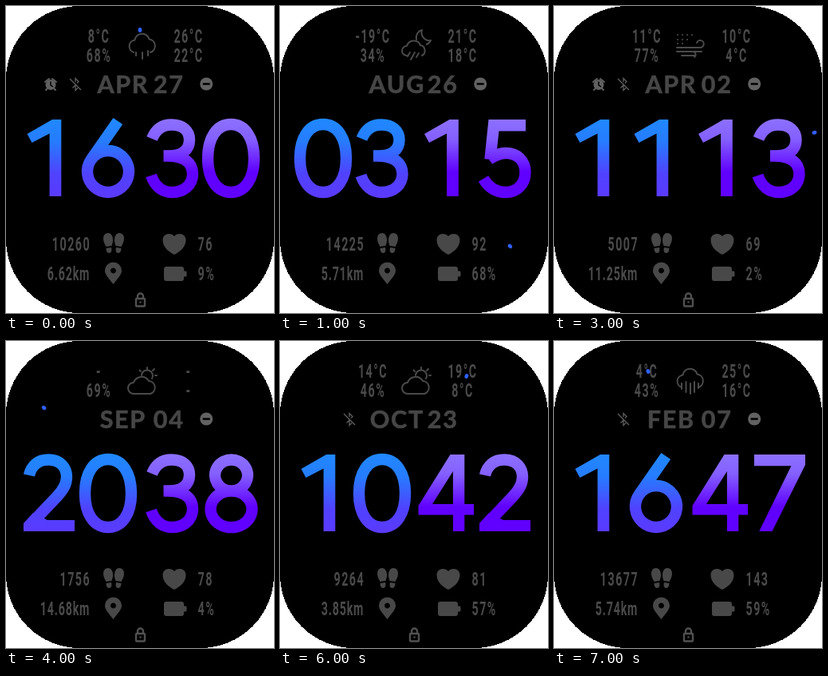
Recreate the animation shown at these times as an HTML page. Size 336 by 384 pixels, loop 8000 ms.

```html
<!DOCTYPE html>
<html lang="en">
<head>
<meta charset="utf-8">
<title>Watch face</title>
<style>
html, body { margin: 0; width: 100%; height: 100%; overflow: hidden; background: #fff; }
svg { display: block; width: 100vw; height: 100vh; }
.ink { fill: #484848; }
.line { fill: none; stroke: #4a4a4a; stroke-width: 2; stroke-linecap: round; stroke-linejoin: round; }
.slim { font: 600 23px Roboto, sans-serif; letter-spacing: 2.4px; fill: #4a4a4a; }
.dist { letter-spacing: 1.3px; }
.date { font: 700 30.5px Lato, sans-serif; letter-spacing: 1.7px; fill: #464646; stroke: #464646; stroke-width: .6; text-anchor: middle; }
.mid { text-anchor: middle; }
.end { text-anchor: end; }
</style>
</head>
<body>
<svg viewBox="0 0 336 384" preserveAspectRatio="none">
  <defs>
    <linearGradient id="blue" gradientUnits="userSpaceOnUse" x1="0" y1="142" x2="0" y2="239">
      <stop offset="0" stop-color="#2088ff"/><stop offset=".28" stop-color="#267cff"/>
      <stop offset=".7" stop-color="#5042ff"/><stop offset="1" stop-color="#5a3aff"/>
    </linearGradient>
    <linearGradient id="violet" gradientUnits="userSpaceOnUse" x1="0" y1="142" x2="0" y2="239">
      <stop offset="0" stop-color="#8c70ff"/><stop offset=".25" stop-color="#8460ff"/>
      <stop offset=".68" stop-color="#6000ff"/><stop offset="1" stop-color="#6000ff"/>
    </linearGradient>
  </defs>
  <rect width="336" height="384" rx="92" shape-rendering="crispEdges"/>

  <path id="weather" class="line"/>

  <g id="alarm" fill="#606060">
    <circle cx="56" cy="98.5" r="6.5"/>
    <path d="M49 95l5-4M63 95l-5-4M52 103l-2 2M60 103l2 2" stroke="#606060" stroke-width="2" stroke-linecap="round"/>
    <path d="M56 94.5v4.500l3 2" fill="none" stroke="#000" stroke-width="1.5"/>
  </g>
  <path id="bluetooth" d="M80 91L94 105M83.5 102.5L87 99V105.5L90 102.5M87 95V90.5L91 94.5L89 96.500" fill="none" stroke="#606060" stroke-width="1.3"/>
  <g id="quiet">
    <circle cx="251.2" cy="97.5" r="8" fill="#626262"/>
    <path d="M246.700 97.5h9" stroke="#000" stroke-width="2.500"/>
  </g>

  <g id="digits" stroke-width="14.4"></g>

  <g class="ink">
    <path d="M128 284C132 284 134 288 134 293C134 296 133 298 132.5 300L125.5 301C124 298 122 295 122 291C122 287 124 284 128 284ZM125.5 303L132 302C133 306 132 309 129.5 309C127 309 125.5 307 125.5 303Z"/>
    <path d="M142 284C138 284 136 288 136 293C136 296 137 298 137.5 300L144.5 301C146 298 148 295 148 291C148 287 146 284 142 284ZM144.5 303L138 302C137 306 138 309 140.5 309C143 309 144.5 307 144.5 303Z"/>
    <path d="M211 311C203 307 196.500 301 196.500 292.500C196.500 288 200 285 204 285C207 285 209.500 286 211 288C212.500 286 215 285 218 285C222 285 225.500 288 225.500 292.500C225.500 301 219 307 211 311Z"/>
    <path fill-rule="evenodd" d="M134.5 348C129 341 124 336 124 331A10.5 10.5 0 0 1 145 331C145 336 140 341 134.5 348ZM134.5 327.5a3.500 3.500 0 1 0 .01 0Z"/>
    <path d="M201 326H220Q223 326 223 329V331.5H225Q226.500 331.5 226.500 333V337Q226.500 338.5 225 338.5H223V341Q223 344 220 344H201Q198 344 198 341V329Q198 326 201 326Z"/>
  </g>
  <g id="lock" fill="none" stroke="#505050" stroke-width="2.4">
    <rect x="163" y="366" width="11" height="9.500" rx="1"/>
    <path d="M165 366V363a3.500 3.500 0 0 1 7 0V366M168.5 369.5v2"/>
  </g>

  <g id="labels"></g>
  <rect id="second" x="165.700" y="27" width="4.600" height="6" rx="2.300" fill="#2f60ff"/>
</svg>
<script>
const $ = id => document.getElementById(id);

// Numerals, centred on x = 0: [stroked path, filled path]
const GLYPHS = {
  0: ['M-29 190.5C-29 165 -18 148 0 148S29 165 29 190.5S18 233 0 233S-29 216 -29 190.5Z', ''],
  1: ['', 'M15.300 142V238H.6V159.5L-21.500 171L-27.500 160L4 142Z'],
  2: ['M-25 168C-22 155 -13 148.5 -1 148.5C14 148.5 22 158 22 170C22 180 17 187 10 194.5L-20 226', 'M-32 238V228L-20 215L-2 224H32V238Z'],
  3: ['M-25.500 166C-21 155 -13 148.5 -1 148.5C13 148.5 21.500 156 21.500 167.5C21.500 180 12 187.5 -4 187.5H-11M-6 187.5C15 187.5 25.500 196 25.500 210C25.500 224 14 233 0 233C-13 233 -22 225 -26.500 212', ''],
  4: ['', 'M22.800 142V204H34.500V217.5H22.800V238H8.400V217.5H-35V206L5 142ZM8.400 163V204H-17.500Z'],
  5: ['M26 149.200H-14L-18.500 192M-20 192C-13 187 -6 184 1 184C16 184 25.500 194 25.500 208C25.500 223 15 233 1 233C-12 233 -21 226 -27 216', ''],
  6: ['M12.300 144L-21.300 192.100A26 26 0 1 0 21.300 192.100A26 26 0 0 0 -21.300 192.100', ''],
  7: ['', 'M-31 142H33V155L-8.500 238H-24.800L15.400 156.200H-31Z'],
  8: ['M.5 148.500a20.500 19.500 0 1 0 .01 0ZM.5 187.500a26 22.800 0 1 0 .01 0Z', '']
};
const SLOTS = [54, 128, 208.5, 282];

const CLOUD = 'M160 58A8 8 0 0 1 161.5 42.5A9.200 9.200 0 0 1 179.5 41.5A8.500 8.500 0 0 1 181 58';
const SKY = {
  rain: CLOUD + 'M163 58v4M171 58v8M178 56v6',
  pour: CLOUD + 'M160 53v7M165.5 51v13M171 53v13M176 51v13M181 53v6',
  night: 'M159 62A6 6 0 0 1 159 50A9 9 0 0 1 176 49A7 7 0 0 1 178 62M163 58l-3 5M169 58l-5 9M174 59l-3 5M171 42A10 10 0 0 1 178 30A10 10 0 0 0 189 43A9.500 9.500 0 0 1 184 48',
  wind: [36, 42, 47].map((y, r) => [0, 1, 2, 3].slice(0, 4 - r).map(i => `M${155 + i * 6} ${y}h.1`).join('')).join('') +
    'M154 52H183A4.500 4.500 0 1 0 179 46M154 57H172M176 57H185M160 62H177M166 57H175A4 4 0 0 1 176 64',
  sun: 'M160 66A7 7 0 0 1 160 52A10.500 10.500 0 0 1 179 50A8.200 8.200 0 0 1 181 66ZM170 43A7 7 0 1 1 183 47M177 35v-2M169 38l-1.500-1.500M184 37l2-2M187 43h2'
};

const state = (time, sec, month, day, sky, temps, steps, km, pulse, charge, flags) =>
  ({ time, sec, month, day, sky, temps, steps, km, pulse, charge, flags });

// Flags: a alarm, b bluetooth off, q do not disturb, l locked
const STATES = [
  state('1630', 0, 'APR', '27', 'rain', ['8°C', '68%', '26°C', '22°C'], 10260, 6.62, 76, 9, 'abql'),
  state('0315', 22, 'AUG', '26', 'night', ['-19°C', '34%', '21°C', '18°C'], 14225, 5.71, 92, 68, 'q'),
  state('2246', 8, 'JUN', '18', 'rain', ['16°C', '52%', '24°C', '13°C'], 8317, 7.48, 84, 35, 'bql'),
  state('1113', 13, 'APR', '02', 'wind', ['11°C', '77%', '10°C', '4°C'], 5007, 11.25, 69, 2, 'abql'),
  state('2038', 52, 'SEP', '04', 'sun', ['-', '69%', '-', '-'], 1756, 14.68, 78, 4, 'ql'),
  state('1112', 38, 'MAR', '09', 'pour', ['18°C', '39%', '-9°C', '-12°C'], 13749, 0.96, 160, 11, 'b'),
  state('1042', 4, 'OCT', '23', 'sun', ['14°C', '46%', '19°C', '8°C'], 9264, 3.85, 81, 57, 'bl'),
  state('1647', 57, 'FEB', '07', 'pour', ['4°C', '43%', '25°C', '16°C'], 13677, 5.74, 143, 59, 'bql')
];

const slim = (x, y, text, kind) =>
  `<text class="slim ${kind}" transform="translate(${x} ${y}) scale(.62 1)">${text}</text>`;

const numeral = (n, i) => {
  const [stroke, fill] = GLYPHS[n], paint = `url(#${i < 2 ? 'blue' : 'violet'})`;
  return `<g transform="translate(${SLOTS[i]} 0)">` +
    `<path d="${stroke}" fill="none" stroke="${paint}"/>` +
    `<path d="${fill}" fill="${paint}" fill-rule="evenodd"/></g>`;
};

function show(s) {
  $('digits').innerHTML = [...s.time].map(numeral).join('');
  $('weather').setAttribute('d', SKY[s.sky]);
  $('labels').innerHTML =
    s.temps.map((t, i) => slim(i < 2 ? 116.5 : 229, i % 2 ? 69.5 : 46, t, 'mid')).join('') +
    `<text class="date" x="146.8" y="109.3">${s.month}</text>` +
    `<text class="date" x="204.2" y="109.3">${s.day}</text>` +
    slim(106.2, 305.5, s.steps, 'end') + slim(105.2, 342.5, s.km + 'km', 'dist end') +
    slim(240.5, 305.5, s.pulse, '') + slim(240.5, 342.5, s.charge + '%', '');
  for (const id of ['alarm', 'bluetooth', 'quiet', 'lock'])
    $(id).style.display = s.flags.includes(id[0]) ? '' : 'none';
  $('second').setAttribute('transform', `rotate(${s.sec * 6} 168 192)`);
}

let current = -1;
const start = performance.now();
function tick() {
  const i = Math.floor((performance.now() - start) / 1000) % STATES.length;
  if (i !== current) show(STATES[current = i]);
  requestAnimationFrame(tick);
}
tick();
</script>
</body>
</html>
```
